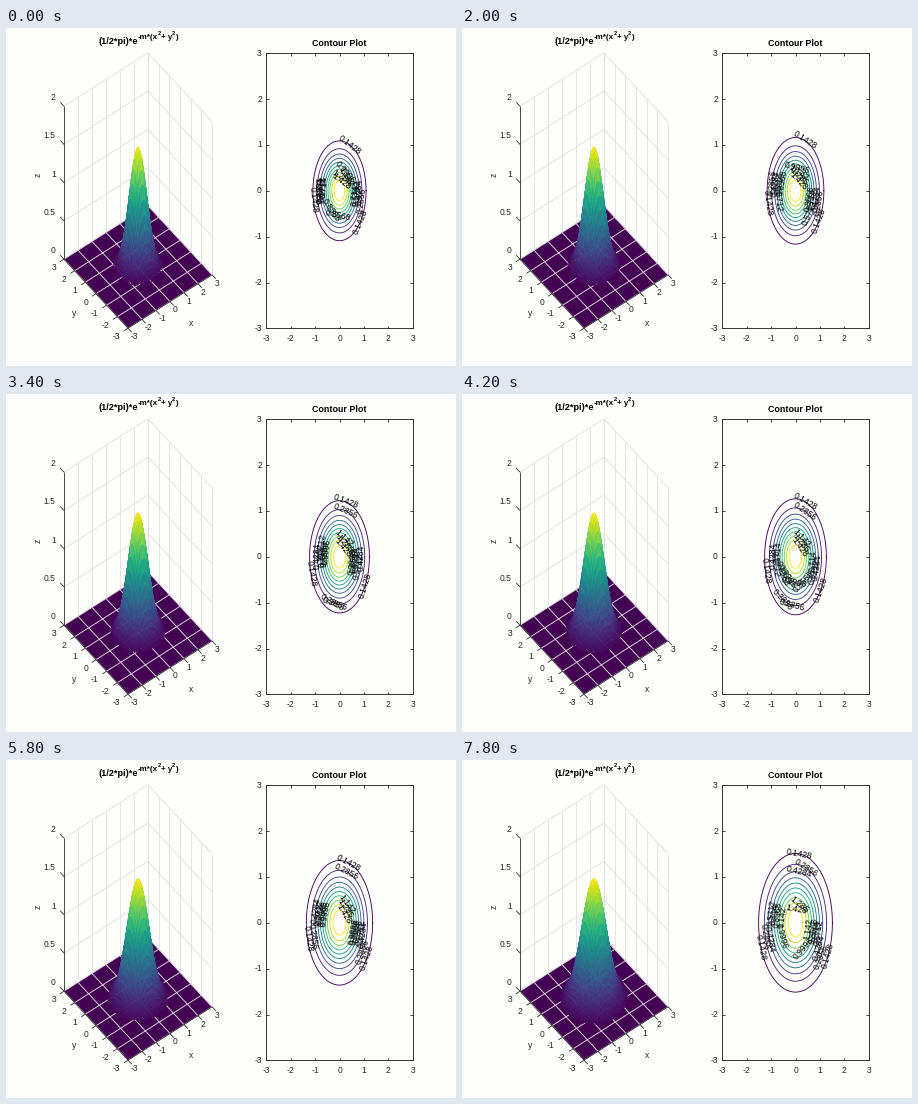
Recreate the animation shown at these times as a matplotlib script. Size 450 by 338 pixels, loop 8 s.

```python
import math
import numpy as np
import matplotlib.pyplot as plt
from matplotlib.animation import FuncAnimation
from matplotlib.collections import LineCollection, PolyCollection

W, H = 450, 338
FRAMES, STEP_MS = 40, 200
PEAK = math.pi / 2
STEP = 0.1                       # mesh spacing
LEVELS = PEAK * np.arange(1, 11) / 11
LABEL_GAP = 115                  # px between labels on one contour
INK, GRID, PAPER = "#262626", "#dedede", "#fefefc"
FLOOR_Z = 0.04
CMAP = plt.cm.viridis

plt.rcParams["font.family"] = "Liberation Sans"
fig = plt.figure(figsize=(W / 72, H / 72), dpi=72, facecolor=PAPER)
ax = fig.add_axes([0, 0, 1, 1])
ax.set_xlim(0, W)
ax.set_ylim(H, 0)
ax.axis("off")


def project(x, y, z):
    """Orthographic 3D view, in stage pixels."""
    px = 132 + 14 * x - 10.67 * y
    py = 239 - 8.9 * x - 11.5 * y - 76.5 * z
    return px, py


def flat(x, y):
    """Contour axes, in stage pixels."""
    return 333.5 + 24.42 * x, 162.8 - 45.87 * y


def lines(segs, color, width, z):
    ax.add_collection(LineCollection(segs, colors=color, linewidths=width, zorder=z))


def label(x, y, s, size=8.5, **kw):
    kw = {"ha": "center", "va": "center", "color": INK, "zorder": 6, **kw}
    return ax.text(x, y, s, fontsize=size, **kw)


def seg3(a, b):
    return [project(*a), project(*b)]


def draw_3d_axes():
    ticks = range(-3, 4)
    heights = np.arange(0, 2.1, 0.5)
    walls = [seg3((t, 3, 0), (t, 3, 2)) for t in ticks]
    walls += [seg3((3, t, 0), (3, t, 2)) for t in ticks]
    for h in heights:
        walls += [seg3((-3, 3, h), (3, 3, h)), seg3((3, 3, h), (3, -3, h))]
    lines(walls, GRID, 0.8, 1)

    corners = [project(*c, 0) for c in ((-3, 3), (3, 3), (3, -3), (-3, -3))]
    ax.add_collection(PolyCollection([corners], facecolors=[CMAP(0.0)],
                                     linewidths=0, zorder=2))
    floor = [seg3((t, -3, 0), (t, 3, 0)) for t in ticks]
    floor += [seg3((-3, t, 0), (3, t, 0)) for t in ticks]
    lines(floor, GRID, 0.9, 2.1)

    edges = [seg3((-3, 3, 0), (-3, 3, 2)), seg3((-3, 3, 0), (-3, -3, 0)),
             seg3((-3, -3, 0), (3, -3, 0))]
    for t in ticks:
        edges += [seg3((t, -3, 0), (t, -3.35, 0)), seg3((-3, t, 0), (-3.3, t, 0))]
        x, y = project(t, -3, 0)
        label(x + 2.5, y + 8.5, str(t), ha="left")
        x, y = project(-3, t, 0)
        label(x - 8, y + 8.5, str(t), ha="right")
    for h in heights:
        edges.append(seg3((-3, 3, h), (-3, 3.35, h)))
        x, y = project(-3, 3, h)
        label(x - 8.3, y - 8.5, f"{h:g}", ha="right")
    lines(edges, INK, 0.8, 3)

    label(185, 295, "x")
    label(68, 285, "y")
    label(32.5, 147, "z", rotation=90)


def draw_flat_axes():
    x0, y0 = flat(-3, 3)
    x1, y1 = flat(3, -3)
    box = [[(x0, y0), (x1, y0)], [(x1, y0), (x1, y1)],
           [(x1, y1), (x0, y1)], [(x0, y1), (x0, y0)]]
    for t in range(-3, 4):
        x, y = flat(t, t)
        box += [[(x, y0), (x, y0 + 2.5)], [(x, y1), (x, y1 - 2.5)],
                [(x0, y), (x0 + 2.5, y)], [(x1, y), (x1 - 2.5, y)]]
        label(x, 310.5, str(t))
        label(255.8, y, str(t), ha="right")
    lines(box, INK, 0.9, 3)


def draw_titles():
    bold = dict(weight="bold", ha="left", va="baseline", color="black")
    label(92.5, 15.5, "(1/2*pi)*e", 9.1, **bold)
    for x, y, s, size in ((131.5, 11, "-m*(x", 8), (151.8, 7, "2", 5.8),
                          (155.3, 11, "+ y", 8), (166, 7, "2", 5.8),
                          (169.3, 11, ")", 8)):
        label(x, y, s, size, **bold)
    label(333.5, 18, "Contour Plot", 8.9, **{**bold, "ha": "center"})


draw_3d_axes()
draw_flat_axes()
draw_titles()

# Mesh rows run from far to near, so later cells cover earlier ones.
axis = np.linspace(3, -3, 61)
X, Y = np.meshgrid(axis, axis)
bump = PolyCollection([], linewidths=0.4, zorder=4)
ax.add_collection(bump)

T = np.linspace(0, 2 * math.pi, 361)
rings = [ax.plot([], [], color=c, lw=0.9, zorder=4)[0]
         for c in CMAP(np.linspace(0, 1, len(LEVELS)))]
tags = []


def draw_bump(m):
    Z = PEAK * np.exp(-m * (X**2 + Y**2))
    P = np.stack(project(X, Y, Z), axis=-1)
    quads = np.stack([P[:-1, :-1], P[:-1, 1:], P[1:, 1:], P[1:, :-1]], axis=2)
    mean = (Z[:-1, :-1] + Z[:-1, 1:] + Z[1:, 1:] + Z[1:, :-1]) / 4
    keep = mean > FLOOR_Z
    colors = CMAP(mean[keep] / PEAK)
    bump.set_verts(quads[keep])
    bump.set_facecolor(colors)
    bump.set_edgecolor(colors)


def tag_ring(r, text, even):
    """Label a ring that starts at its lowest mesh row.

    Labels sit evenly around it, or at a fixed gap about its middle."""
    row = math.floor(r / STEP) * STEP
    start = math.atan2(-row, -math.sqrt(max(r * r - row * row, 0)))
    x, y = flat(r * np.cos(start + T), r * np.sin(start + T))
    dist = np.concatenate([[0], np.cumsum(np.hypot(np.diff(x), np.diff(y)))])
    total = dist[-1]
    n = math.ceil(total / LABEL_GAP)
    gap = total / n if even else LABEL_GAP
    for j in range(n):
        i = int(np.searchsorted(dist, total / 2 + (j - (n - 1) / 2) * gap))
        i = min(max(i, 1), len(T) - 2)
        slope = math.degrees(math.atan2(y[i - 1] - y[i + 1], x[i + 1] - x[i - 1]))
        angle = (slope + 90) % 180 - 90
        tags.append(label(x[i], y[i], text, rotation=angle,
                          rotation_mode="anchor", color="black"))


def update(i):
    m = 2.025 - 0.025 * i
    rng = np.random.default_rng(i)
    draw_bump(m)
    while tags:
        tags.pop().remove()
    for k, (ring, level) in enumerate(zip(rings, LEVELS)):
        r = math.sqrt(math.log(PEAK / level) / m)
        ring.set_data(*flat(r * np.cos(T), r * np.sin(T)))
        tag_ring(r, f"{level:.4g}", k == 0 or rng.random() < 0.6)
    return [bump, *rings, *tags]


anim = FuncAnimation(fig, update, frames=FRAMES, interval=STEP_MS,
                     repeat=True, repeat_delay=0, blit=False)
plt.show()
```
